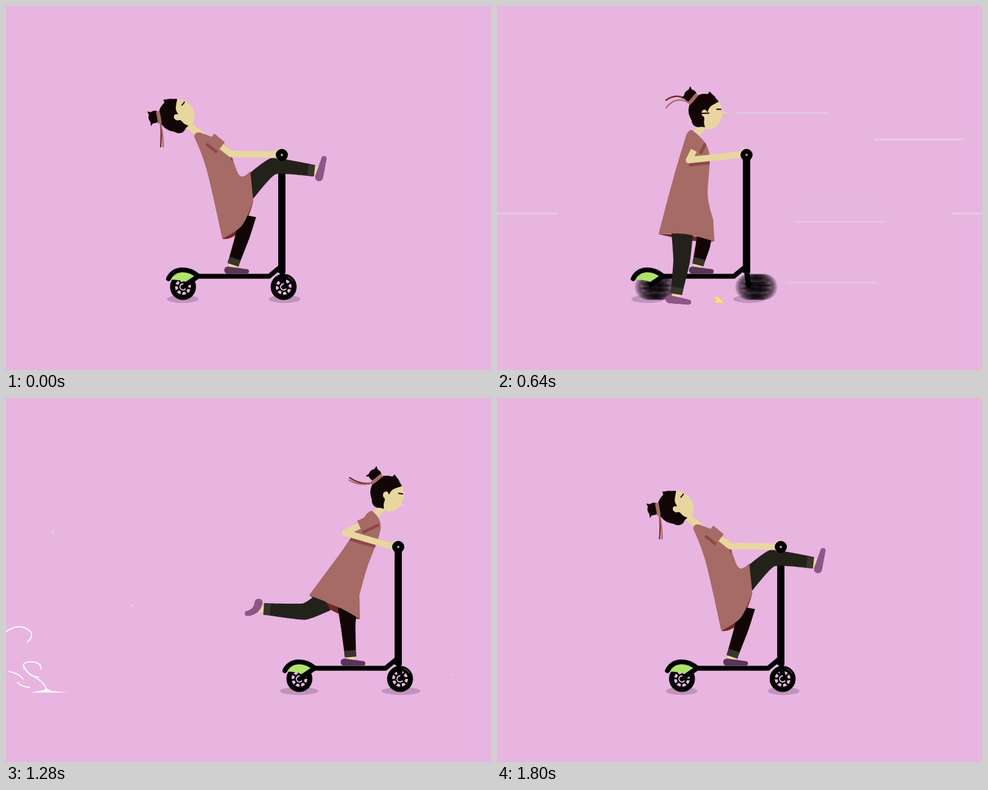
An HTML page with a canvas that plays this animation: 800 by 600 pixels, repeating every 1840 ms.

```html
<!DOCTYPE html>
<html lang="en">
<head>
<meta charset="utf-8">
<title>Scooter ride</title>
<style>
html, body { margin: 0; width: 800px; height: 600px; overflow: hidden; background: #e8b4e0; }
canvas { display: block; }
</style>
</head>
<body>
<canvas id="stage" width="800" height="600"></canvas>
<script>
const ctx = document.getElementById('stage').getContext('2d');
const LOOP = 1840, STEP = 40;
const PINK = '#e8b4e0', SKIN = '#e8d69f', HAIR = '#110605', DRESS = '#a56b64',
  FOLD = '#8e4848', LINING = '#742723', OLIVE = '#22221a', CUFF = '#39352a',
  SHOE = '#8f5689', SHOE_DARK = '#5a3558', BLACK = '#000';

// Key points of the rider, x measured from the handle.
// head: x, y, tilt; ribbon: angle, curl, spread; foot: angle, toe curl
const lean = {
  collar: [-134, 209], back: [-124, 270], tail: [-98, 384], hem: [-66, 362], edge: [-47, 322],
  lap: [-52, 273], waist: [-70, 279], chest: [-92, 231], elbow: [-84, 244],
  head: [-174, 180, -61], ribbon: [87, -2, 3], stand: [-58, 345],
  seat: [-59, 304], knee: [-14, 264], ankle: [49, 271], foot: [-75, 0]
};
const kick = {
  collar: [-105, 198], back: [-125, 290], tail: [-134, 373], hem: [-84, 359], edge: [-51, 310],
  lap: [-49, 281], waist: [-67, 285], chest: [-76, 227], elbow: [-85, 256],
  head: [-133.5, 169, -68], ribbon: [124, 1, 13], stand: [-77, 350],
  seat: [-58, 304], knee: [-7, 280], ankle: [42, 264], foot: [-88, 0]
};
const plant = { knee: [-62, 410], ankle: [-51, 468], foot: [9, 0] };
const push = {
  collar: [-88, 206], back: [-121, 285], tail: [-145, 376], hem: [-100, 376], edge: [-53, 388],
  lap: [-55, 352], waist: [-64, 312], chest: [-62, 240], elbow: [-95, 254],
  head: [-67.5, 173.5, -10], ribbon: [178, 19, 9], stand: [-69, 375],
  seat: [-106, 372], knee: [-107, 420], ankle: [-115, 470], foot: [9, 0]
};
const glide = {
  collar: [-42, 187], back: [-90, 248], tail: [-160, 298], hem: [-115, 320], edge: [-68, 363],
  lap: [-64, 325], waist: [-52, 282], chest: [-29, 215], elbow: [-88, 222],
  head: [-18, 157, 0], ribbon: [205, 14, 6], stand: [-84, 345],
  seat: [-116, 322], knee: [-156, 348], ankle: [-221, 340], foot: [100, 72]
};
const coast = { tail: [-147, 325], hem: [-100, 344], edge: [-63, 364], ribbon: [190, -9, 3],
  seat: [-120, 334], knee: [-155, 352], ankle: [-217, 348] };
const sag = { ribbon: [206, 8, 3], knee: [-146, 358], ankle: [-213, 362] };
const TIMELINE = [[0, lean], [480, kick], [560, plant], [640, push], [960, glide],
  [1280, coast], [1800, sag]];

// y, x, thickness
const STREAKS = [[176, 475, 3], [220, 700, 4], [316, 571, 1.5], [342, 830, 4],
  [356, 569, 2.5], [430, 811, 1.5], [456, 556, 3]];

const SWIRL = new Path2D('M67 401Q58 388 42 388Q32 390 30 398Q14 406 14 425Q18 447 74 452');
const PUFF = new Path2D('M75 447Q95 447 117 464L90 460Q108 468 124 483L150 479L165 485.5H82L92 481Q75 478 70 471H84Q88 464 65 456Q78 458 75 447Z');
const WISPS = new Path2D('M0 385Q25 368 42 387Q43 397 35 402M30 446Q24 434 44 435Q58 436 58 447M30 443Q38 460 54 460M5 451Q20 453 28 463M19 469Q26 476 39 477M47 460Q66 470 66 481');

const lerp = (a, b, s) => a.map((v, i) => v + (b[i] - v) * s);
const clamp = s => Math.min(1, Math.max(0, s));
const polar = (deg, r) => [r * Math.cos(deg * Math.PI / 180), r * Math.sin(deg * Math.PI / 180)];
const add = (a, b) => a.map((v, i) => v + b[i]);

// Roll back, shoot forward, drift back
function rideAt(t) {
  if (t < 560) {
    const s = t / 560;
    return 455 - 112 * s * (1.6 - .6 * s);
  }
  if (t < 1040) return 343 + 334.5 * (1 - (1 - clamp((t - 596) / 444)) ** 2.2);
  const s = (t - 1040) / 800;
  return 677.5 - 222.5 * s * s * (1.75 - .75 * s);
}

// Each part eases between the keys that mention it
function poseAt(t) {
  const pose = {};
  for (const part in lean) {
    const keys = TIMELINE.filter(k => part in k[1]);
    const next = keys.findIndex(k => k[0] > t);
    const b = keys[next < 0 ? keys.length - 1 : next];
    const a = next < 0 ? b : keys[Math.max(0, next - 1)];
    const s = a === b ? 0 : (t - a[0]) / (b[0] - a[0]);
    pose[part] = lerp(a[1][part], b[1][part], s * s * (3 - 2 * s));
  }
  return pose;
}

// Adds a smooth open curve to a path
function curve(path, pts, k = 1 / 6) {
  path.lineTo(...pts[0]);
  for (let i = 0; i < pts.length - 1; i++) {
    const a = pts[i], b = pts[i + 1], o = pts[i - 1] || a, c = pts[i + 2] || b;
    path.bezierCurveTo(a[0] + (b[0] - o[0]) * k, a[1] + (b[1] - o[1]) * k,
      b[0] - (c[0] - a[0]) * k, b[1] - (c[1] - a[1]) * k, b[0], b[1]);
  }
}

function fill(color, path) {
  ctx.fillStyle = color;
  path ? ctx.fill(path) : ctx.fill();
}

function stroke(width, color, cap = 'butt') {
  ctx.lineWidth = width;
  ctx.lineCap = cap;
  ctx.lineJoin = cap === 'round' ? 'round' : 'miter';
  ctx.strokeStyle = color;
  ctx.stroke();
}

function disc(x, y, r, color, ry = r) {
  ctx.beginPath();
  ctx.ellipse(x, y, r, ry, 0, 0, 7);
  fill(color);
}

function arc(x, y, r, from, to, width, color) {
  ctx.beginPath();
  ctx.arc(x, y, r, from, to);
  stroke(width, color);
}

function line(pts, width, color, cap) {
  ctx.beginPath();
  pts.forEach(p => ctx.lineTo(...p));
  stroke(width, color, cap);
}

function shape(pts, color) {
  ctx.beginPath();
  pts.forEach(p => ctx.lineTo(...p));
  fill(color);
}

// Tapered band through points with a width each
function limb(pts, widths, color) {
  const left = [], right = [];
  pts.forEach(([x, y], i) => {
    const a = pts[i - 1] || pts[i], b = pts[i + 1] || pts[i];
    const ang = Math.atan2(b[1] - a[1], b[0] - a[0]);
    const nx = -Math.sin(ang) * widths[i] / 2, ny = Math.cos(ang) * widths[i] / 2;
    left.push([x + nx, y + ny]);
    right.unshift([x - nx, y - ny]);
  });
  ctx.beginPath();
  curve(ctx, left, .08);
  curve(ctx, right, .08);
  fill(color);
}

// Returns a helper for points beyond the ankle, along the shin
function leg(hip, knee, ankle, widths, color) {
  const d = Math.hypot(ankle[0] - knee[0], ankle[1] - knee[1]);
  const beyond = r => lerp(knee, ankle, 1 + r / d);
  line([ankle, beyond(12)], 13, SKIN);
  limb([hip, knee, beyond(4)], widths, color);
  line([beyond(-6), beyond(5)], 19, CUFF);
  return beyond;
}

// Swept along a bend, heel wide and toe narrow
function shoe(heel, [angle, curl]) {
  const bend = add(heel, polar(angle, 16)), toe = add(bend, polar(angle + curl, 17));
  for (let s = 0; s <= 1; s += .025) {
    const [x, y] = lerp(lerp(heel, bend, s), lerp(bend, toe, s), s);
    disc(x, y, 6.5 - 2.5 * s, SHOE);
  }
}

function wheel(x, spin) {
  arc(x, 463, 17.2, 0, 7, 8.4, BLACK);
  arc(x, 463, 18, -1.2, -.5, 1, '#77707a');
  for (let i = 0; i < 8; i++) {
    const a = spin + i * 45;
    line([add([x, 463], polar(a, 6)), add([x, 463], polar(a, 14))], 3, BLACK);
  }
  disc(x, 463, 8.5, BLACK);
}

function wheels(p, t) {
  const shift = rideAt(t + 20) - p, fast = Math.abs(shift) > 12, copies = fast ? 14 : 1;
  ctx.globalAlpha = fast ? .17 : 1;
  for (const x of [-163, 3]) {
    for (let i = 0; i < copies; i++) wheel(x + shift * i / 14, p * 2.7);
  }
  ctx.globalAlpha = 1;
  return fast;
}

function scooter(p, t) {
  const rx = t < 480 ? 26 - t / 160 : t < 960 ? 23 + (t - 480) / 46 : 33.5 - ((t - 960) / 840) ** 1.5 * 7.5;
  disc(-163.5, 483, rx, '#c192bb', 6.5);
  disc(4.5, 483, rx, '#c192bb', 6.5);
  const fast = wheels(p, t);

  ctx.beginPath();
  ctx.moveTo(-184, 451);
  ctx.quadraticCurveTo(-164, 422, -143, 446);
  ctx.lineTo(-157, 455);
  ctx.quadraticCurveTo(-170, 451, -184, 451);
  fill('#b0e26a');
  ctx.beginPath();
  ctx.moveTo(-187, 449.5);
  ctx.bezierCurveTo(-178, 431, -155, 431, -138, 445);
  stroke(8, BLACK, 'round');
  line([[-161, 461], [-138, 445.5], [-21, 445.5], [-1, 429]], 8, BLACK);
  line([[0, 245], [0, 440]], 12, BLACK);
  line([[0, 436], [3.5, 461]], 8.5, BLACK, 'round');
  if (!fast) for (const x of [-163, 3]) arc(x, 463, 5, .6, 4.8, 1.8, '#eadfea');
}

function streaks(t) {
  const s = (t - 600) / 690;
  if (s < 0 || s >= 1) return;
  const go = 739 * (1 - (1 - s) ** 3) - 117, w = 150 * (1 - s * s);
  for (const [y, x, h] of STREAKS) {
    const a = ((x - go - w / 2) % 800 + 800) % 800;
    ctx.fillStyle = h < 2 ? '#e6bfe1' : '#e5c8e3';
    ctx.fillRect(a, y - h / 2, w, h);
    ctx.fillRect(a - 800, y - h / 2, w, h);
  }
}

function smoke(t) {
  if (t < 600 || t >= 1640) return;
  if (t < 680) {
    shape([[357, 478], [366, 481], [374, 489], [358, 488], [364, 485]], '#fdf13a');
    return;
  }
  ctx.save();
  ctx.strokeStyle = '#fff';
  ctx.lineCap = 'round';
  if (t < 1120) {
    const s = clamp((t - 600) / 360), ease = 1 - (1 - s) ** 2;
    ctx.translate(400 - 235 * ease - Math.max(0, t - 960) * .13, 485);
    ctx.scale(ease, ease);
    ctx.translate(-165, -485);
    ctx.lineWidth = 3;
    ctx.stroke(SWIRL);
    fill('#fff', PUFF);
  } else {
    ctx.translate((1280 - t) * .122, 0);
    ctx.lineWidth = 1.9 - (t - 1280) * .004;
    ctx.stroke(WISPS);
    if (t < 1440) shape([[40, 485.5], [60, 482], [67, 479], [75, 483], [103, 485.5]], '#fff');
  }
  ctx.restore();
}

function head([cx, cy, tilt], [angle, curl, spread]) {
  ctx.save();
  ctx.translate(cx, cy);
  const root = add(polar(tilt, -23), polar(tilt + 90, -17));
  [LINING, DRESS].forEach((color, i) => {
    const a = angle + (i ? -spread : spread);
    const bend = add(add(root, polar(a, 20)), polar(a + 90, curl));
    ctx.beginPath();
    ctx.moveTo(...root);
    ctx.quadraticCurveTo(...bend, ...add(root, polar(a, 41)));
    stroke(2.3, color);
  });

  ctx.rotate(tilt * Math.PI / 180);
  shape([[-28, -34], [-36, -28], [-28, -27]], HAIR);
  shape([[-22, -39], [-18, -45], [-16, -39]], HAIR);
  shape([[8, -27], [12, -31], [21, -19]], HAIR);
  disc(-20, -30, 10.5, HAIR, 10);
  disc(-1, -1.5, 27, HAIR, 27.5);
  disc(-14, 12.5, 11.5, HAIR);
  ctx.beginPath();
  curve(ctx, [[25, -12], [9, -6], [3, 2]]);
  curve(ctx, [[3, 2], [-1, -3], [-6, -1], [-7, 5], [-4, 10], [-6, 19], [-4, 28],
    [6, 30], [18, 24], [26, 11], [27, -2], [25, -12]]);
  fill(SKIN);
  line([[-25, -17], [-9, -30]], 6, DRESS);
  line([[18, 0], [26, 1.2]], 2, HAIR);
  ctx.restore();
}

function arm({ collar, chest, elbow }, dress) {
  const hand = [-9, 245], shoulder = lerp(collar, chest, .4), cuff = lerp(shoulder, elbow, .53);
  const side = elbow[0] > shoulder[0] ? 1 : -1;
  const deg = Math.atan2(elbow[1] - shoulder[1], elbow[0] - shoulder[0]) * 180 / Math.PI;
  const under = polar(deg + 90 * side, 12);
  ctx.save();
  ctx.clip(dress);
  line([add(shoulder, under), add(cuff, under)], 5, FOLD);
  line([add(elbow, [0, 8]), add(hand, [0, 8])], 5.5, FOLD);
  ctx.restore();
  line([cuff, elbow, hand], 10.5, SKIN, 'round');
  limb([shoulder, cuff], [19, 18], DRESS);
}

function rider(t) {
  const p = poseAt(t);

  ctx.beginPath();
  ctx.moveTo(...p.tail);
  ctx.quadraticCurveTo(p.tail[0] * .35 + p.edge[0] * .65,
    Math.max(p.tail[1], p.edge[1]) + 3, ...p.edge);
  ctx.lineTo(...p.hem);
  fill(LINING);

  const ankle = [-79, 422], [sx, sy] = p.stand;
  leg(p.stand, [sx * .7 + ankle[0] * .3, sy * .58 + ankle[1] * .42], ankle,
    [24 + (375 - sy) * .25, 24, 18.5], HAIR);
  limb([[-89, 435.5], [-58, 437.5]], [12, 7.5], SHOE_DARK);
  disc(-89, 435.5, 6, SHOE_DARK);
  disc(-58, 437.5, 3.8, SHOE_DARK);

  const beyond = leg(p.seat, p.knee, p.ankle, [36, 27.5, 19], OLIVE);
  shoe(add(beyond(15), polar(p.foot[0], -10)), p.foot);

  const [hx, hy, tilt] = p.head;
  const jaw = add([hx, hy], add(polar(tilt, -4), polar(tilt + 90, 20)));
  line([jaw, add(p.collar, [4, 6])], 12, SKIN, 'round');

  const dress = new Path2D();
  curve(dress, [add(p.collar, [-11, 5]), p.back, p.tail]);
  curve(dress, [p.tail, p.hem, p.edge]);
  curve(dress, [p.lap, p.waist, p.chest, p.collar, add(p.collar, [-11, 5])]);
  fill(DRESS, dress);

  arm(p, dress);
  head(p.head, p.ribbon);
  if (t >= 600 && t < 1040) {
    shape([[hx + 18, 174], [hx + 30, 174.5], [hx + 44, 176.5], [hx + 18, 178]], SKIN);
    line([[hx - 20, 177.5], [hx + 6, 176.5]], 2, HAIR);
  }
  disc(-2.5, 244, 10, SKIN);
  disc(0, 245.5, 10, BLACK);
  disc(0, 245.5, 2, '#b3a071');
}

function draw(t) {
  const p = rideAt(t);
  ctx.fillStyle = PINK;
  ctx.fillRect(0, 0, 800, 600);
  streaks(t);
  smoke(t);
  ctx.save();
  ctx.translate(p, 0);
  scooter(p, t);
  rider(t);
  ctx.restore();
}

const start = performance.now();
function tick() {
  const now = Math.floor((performance.now() - start) / STEP) * STEP;
  // The ride restarts one step before the loop closes
  draw((now + STEP) % LOOP - STEP);
  requestAnimationFrame(tick);
}
tick();
</script>
</body>
</html>
```
